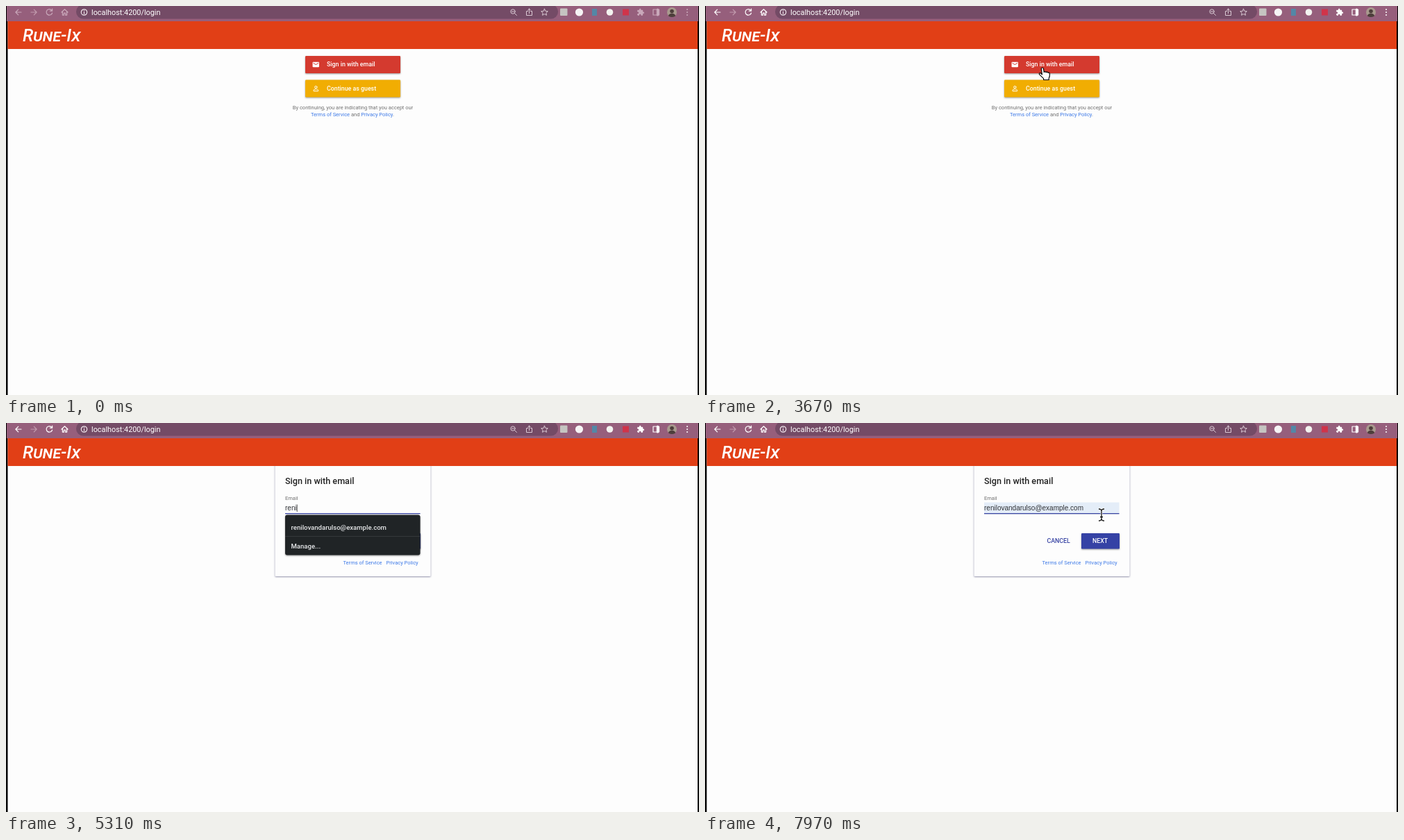
An HTML page that plays this animation: 998x561 px, repeating every 8000 ms.

```html
<!DOCTYPE html>
<html lang="en">
<head>
<meta charset="utf-8">
<title>Sign in</title>
<style>
  html, body { margin: 0; width: 100%; height: 100%; overflow: hidden; background: #000; }
  svg { display: block; width: 998px; height: 561px; }
  text { font-family: Roboto, sans-serif; white-space: pre; }
  .brand { font: italic 500 25px Roboto, sans-serif; font-variant: small-caps; fill: #fff; }
  .url { font-size: 10.86px; fill: #fff; }
  .button { font-size: 8.8px; font-weight: 500; fill: #fff; }
  .title { font-size: 12.6px; font-weight: 500; fill: #242424; }
  .small { font-size: 7.5px; fill: #707070; }
  .link { fill: #3b78e7; }
  .field { font: 10px "Liberation Sans", Arial, sans-serif; fill: #303236; }
  .option { font-size: 9.55px; font-weight: 500; fill: #e6e8ea; }
  .line { fill: none; stroke-width: 1.2; stroke-linecap: round; stroke-linejoin: round; }
  .raised { filter: drop-shadow(0 1px 1px rgba(0, 0, 0, .4)); }
  .card { filter: drop-shadow(0 1px 1.2px rgba(40, 40, 90, .5)); }
</style>
</head>
<body>
<svg viewBox="0 0 998 561">
  <rect x="2.5" y="21" width="993.5" height="540" fill="#fdfdfd"/>

  <!-- browser toolbar -->
  <rect x="1" width="996" height="22" fill="#965f7c"/>
  <rect x="101" y="-2" width="694" height="20.5" rx="10" fill="#744b66"/>
  <g id="navigation" class="line">
    <path d="M22 9H14M17.7 5.2 13.9 9l3.8 3.8"/>
    <path d="M66 6.4A4.3 4.3 0 1 0 66.6 10M66.6 4v3.2h-3.2"/>
    <path d="M80 9l4.5-4.3L89 9M81.4 8.2v5h2v-3h2.2v3h2v-5"/>
    <rect x="932" y="5" width="8.5" height="8"/>
    <path d="M938.4 5v8" stroke-width="3.2"/>
    <path d="M981 5v.01M981 9v.01M981 13v.01" stroke-width="2"/>
    <path id="puzzle" transform="translate(908.3 3.3) scale(.47)" stroke="none"
      d="M20.5 11H19V7c0-1.1-.9-2-2-2h-4V3.5C13 2.12 11.88 1 10.5 1S8 2.12 8 3.5V5H4c-1.1 0-2 .9-2 2v3.8h1.5a2.7 2.7 0 0 1 0 5.4H2V20c0 1.1.9 2 2 2h3.8v-1.5a2.7 2.7 0 0 1 5.4 0V22H17c1.1 0 2-.9 2-2v-4h1.5a2.5 2.5 0 0 0 0-5z"/>
  </g>
  <path class="line" stroke="#c29caf" d="M36 9h8M40.3 5.2 44.1 9l-3.8 3.8"/>
  <g class="line" stroke="#eee4ea" stroke-width="1">
    <circle cx="112.5" cy="9" r="4.2"/><path d="M112.5 8.7v2.5M112.5 6.7v.1"/>
  </g>
  <g class="line" stroke="#d9c9d3" style="stroke-width:1">
    <circle cx="730" cy="8" r="3.2"/><path d="M732.5 10.5l3 3M728.5 8h3"/>
    <path d="M751.5 7.5h-2v6h8v-6h-2M753.5 10.5v-6.500M751.500 6l2-2 2 2"/>
    <path d="M775.500 4.200l1.400 3.100 3.400.4-2.500 2.300.7 3.300-3-1.700-3 1.700.7-3.300-2.500-2.300 3.400-.4z"/>
  </g>
  <rect x="798" y="3.500" width="10.500" height="10.500" rx="1" fill="#c5c4c1"/>
  <circle cx="825.500" cy="9" r="5.600" fill="#f6f4f5"/>
  <rect x="844" y="4" width="7" height="10" fill="#5387a6"/>
  <circle cx="869.500" cy="9" r="4.800" fill="#f3f3f0"/>
  <rect x="888" y="4.500" width="9" height="9" fill="#d0344a"/>
  <circle cx="959" cy="9" r="7" fill="#a99a8e"/>
  <path d="M954 14.500c0-5 10-5 10 0q-5 3-10 0" fill="#4d3e3b"/>
  <circle cx="959" cy="7.500" r="2.800" fill="#4d3e3b"/>
  <text class="url" x="123" y="12.600">localhost:4200/login</text>

  <!-- sign-in choices -->
  <g id="choices">
    <g class="raised">
      <rect x="431" y="72" width="137" height="25" rx="1.300" fill="#d43a2f"/>
      <rect x="431" y="106.500" width="137" height="25" rx="1.300" fill="#f1ad02"/>
    </g>
    <path transform="translate(440.600 78.900) scale(.47)" fill="#fff"
      d="M20 4H4c-1.100 0-2 .9-2 2v12c0 1.100.9 2 2 2h16c1.100 0 2-.9 2-2V6c0-1.100-.9-2-2-2zm0 4l-8 5-8-5V6l8 5 8-5z"/>
    <g class="line" stroke="#fff" style="stroke-width:1">
      <circle cx="446.300" cy="117" r="1.600"/>
      <path d="M443 122.300v-.8c0-2.200 6.600-2.200 6.600 0v.8z"/>
    </g>
    <text class="button" x="462" y="87.400">Sign in with email</text>
    <text class="button" x="462" y="121.900">Continue as guest</text>
    <text class="small" x="499.500" y="148.600" text-anchor="middle">By continuing, you are indicating that you accept our</text>
    <text class="small" x="499" y="158.600" text-anchor="middle"><tspan class="link">Terms of Service</tspan> and <tspan class="link">Privacy Policy</tspan>.</text>
  </g>

  <!-- email form -->
  <g id="form">
    <rect class="card" x="387.500" y="56" width="224" height="165" rx="1.300" fill="#fdfdfd"/>
    <text class="title" x="402" y="88.200">Sign in with email</text>
    <text class="small" x="402" y="111.300">Email</text>
    <rect id="fill" x="402" y="114.500" width="194.500" height="16" fill="#e4edf8"/>
    <path d="M402 130.800h194.500" stroke="#c8c8cc" stroke-width=".7"/>
    <path id="underline" stroke="#3743a3" stroke-width="1.300"/>
    <text id="value" class="field" x="402" y="126"></text>
    <path id="caret" stroke="#222" stroke-width=".8"/>
    <text class="button" x="492.500" y="172.900" style="fill:#3743a3">CANCEL</text>
    <rect class="raised" x="542" y="159" width="55" height="22.500" rx="1.300" fill="#3542a5"/>
    <text class="button" x="558" y="172.900">NEXT</text>
    <text class="small link" x="485.500" y="203.500">Terms of Service</text>
    <text class="small link" x="547.500" y="203.500">Privacy Policy</text>
    <g id="dropdown">
      <rect class="raised" x="402" y="132.500" width="194.500" height="58" rx="3" fill="#202426"/>
      <rect id="hover" x="402" y="137" width="194.500" height="26" fill="#3c4043"/>
      <path d="M402 163.500h194.500" stroke="#3a3e41" stroke-width=".8"/>
      <text id="suggestion" class="option" x="410.500" y="153.600"></text>
      <text class="option" x="410.500" y="180.800">Manage...</text>
    </g>
  </g>

  <rect x="2.500" y="22" width="993.500" height="40" fill="#e13f16"/>
  <text class="brand" x="24" y="51">Rune-Ix</text>

  <!-- pointers, each with its hotspot at 0,0 -->
  <g id="pointer" stroke-linejoin="round">
    <path id="arrow" d="M0 0v16.500l3.800-3.500 2.700 6.300 2.900-1.200-2.700-6.100h5.200z" fill="#050505" stroke="#fff" stroke-width="1.200"/>
    <path id="hand" fill="#fff" stroke="#080808" stroke-width="1.200"
      d="M-1.700 1c0-2 3-2 3.200 0l.7 5c.4-1.300 2.700-1.200 2.900.3.600-1.100 2.600-.8 2.900.7.700-.9 2.300-.4 2.400 1 .2 3.300 0 5-1.200 6.800v2.200H1.600v-1.900L-4 9.700c-1.700-2 .4-3.200 1.900-1.900l1.500 1.500z"/>
    <g id="ibeam" fill="none">
      <path d="M-4-8.500Q0-8.500 0-5.500 0-8.500 4-8.500M0-6V6M-4 8.500Q0 8.500 0 5.500 0 8.500 4 8.500M-2 3h4" stroke="#fff" stroke-width="2.800"/>
      <path d="M-4-8.500Q0-8.500 0-5.500 0-8.500 4-8.500M0-6V6M-4 8.500Q0 8.500 0 5.500 0 8.500 4 8.500M-2 3h4" stroke="#111" stroke-width="1.300"/>
    </g>
  </g>
</svg>
<script>
const DURATION = 8000;
const EMAIL = 'renilovandarulso@example.com';
const TIMES = { focus: 2700, form: 3950, typing: 4780, popup: 4930, hover: 6750, pick: 7150 };
const KEY_DELAY = 150, TYPED = 8;

// time, x, y of the pointer
const PATH = [
  [1850, 560, 24], [2150, 487.5, 82], [2650, 487.5, 82], [2900, 486, 88],
  [6400, 486, 100], [6750, 488, 150], [7350, 488, 150], [7850, 571, 132.500], [8000, 571, 132.500]
];
// start time and shape of the pointer
const SHAPES = [
  [0, ''], [1850, 'arrow'], [2700, 'hand'], [3950, 'ibeam'], [4780, ''],
  [6400, 'arrow'], [7500, 'ibeam']
];

const $ = id => document.getElementById(id);
const show = (id, on) => $(id).setAttribute('visibility', on ? 'inherit' : 'hidden');
const clamp = x => Math.max(0, Math.min(1, x));
const ease = x => x * x * (3 - 2 * x);

function pointerAt(t) {
  const next = PATH.findIndex(p => p[0] > t);
  if (next <= 0) return PATH[0].slice(1);
  const [t0, x0, y0] = PATH[next - 1], [t1, x1, y1] = PATH[next];
  const k = ease((t - t0) / (t1 - t0));
  return [x0 + (x1 - x0) * k, y0 + (y1 - y0) * k];
}

function drawField(t) {
  const { form, typing, popup, hover, pick } = TIMES;
  const count = t < typing ? 0 : Math.min(TYPED, 1 + Math.floor((t - typing) / KEY_DELAY));
  const filled = t >= hover;
  $('value').textContent = filled ? EMAIL : EMAIL.slice(0, count);

  const inForm = t >= form, open = t >= popup && t < pick;
  show('fill', inForm && filled);
  show('dropdown', open);
  show('hover', open && filled);

  const half = 97.25 * ease(clamp((t - form) / 200));
  $('underline').setAttribute('d', `M${499.25 - half} 130.600h${2 * half}`);

  const lastInput = t >= pick ? pick
    : count ? typing + (count - 1) * KEY_DELAY : form;
  const blinkOn = (t - lastInput) % 1000 < 500;
  const x = 402.500 + (count || filled ? $('value').getComputedTextLength() : 0);
  $('caret').setAttribute('d', `M${x} 117.500v10.500`);
  show('caret', inForm && blinkOn && (!filled || t >= pick));
}

function draw(t) {
  const tint = t >= TIMES.focus ? '#fff' : '#c9a8ba';
  $('navigation').setAttribute('stroke', tint);
  $('puzzle').setAttribute('fill', tint);
  show('choices', t < TIMES.form);
  show('form', t >= TIMES.form);
  drawField(t);

  const shape = SHAPES.filter(s => s[0] <= t).pop()[1];
  for (const id of ['arrow', 'hand', 'ibeam']) show(id, id === shape);
  $('pointer').setAttribute('transform', `translate(${pointerAt(t)})`);
}

$('suggestion').textContent = EMAIL;
const start = performance.now();
function tick() {
  draw((performance.now() - start) % DURATION);
  requestAnimationFrame(tick);
}
tick();
</script>
</body>
</html>
```
